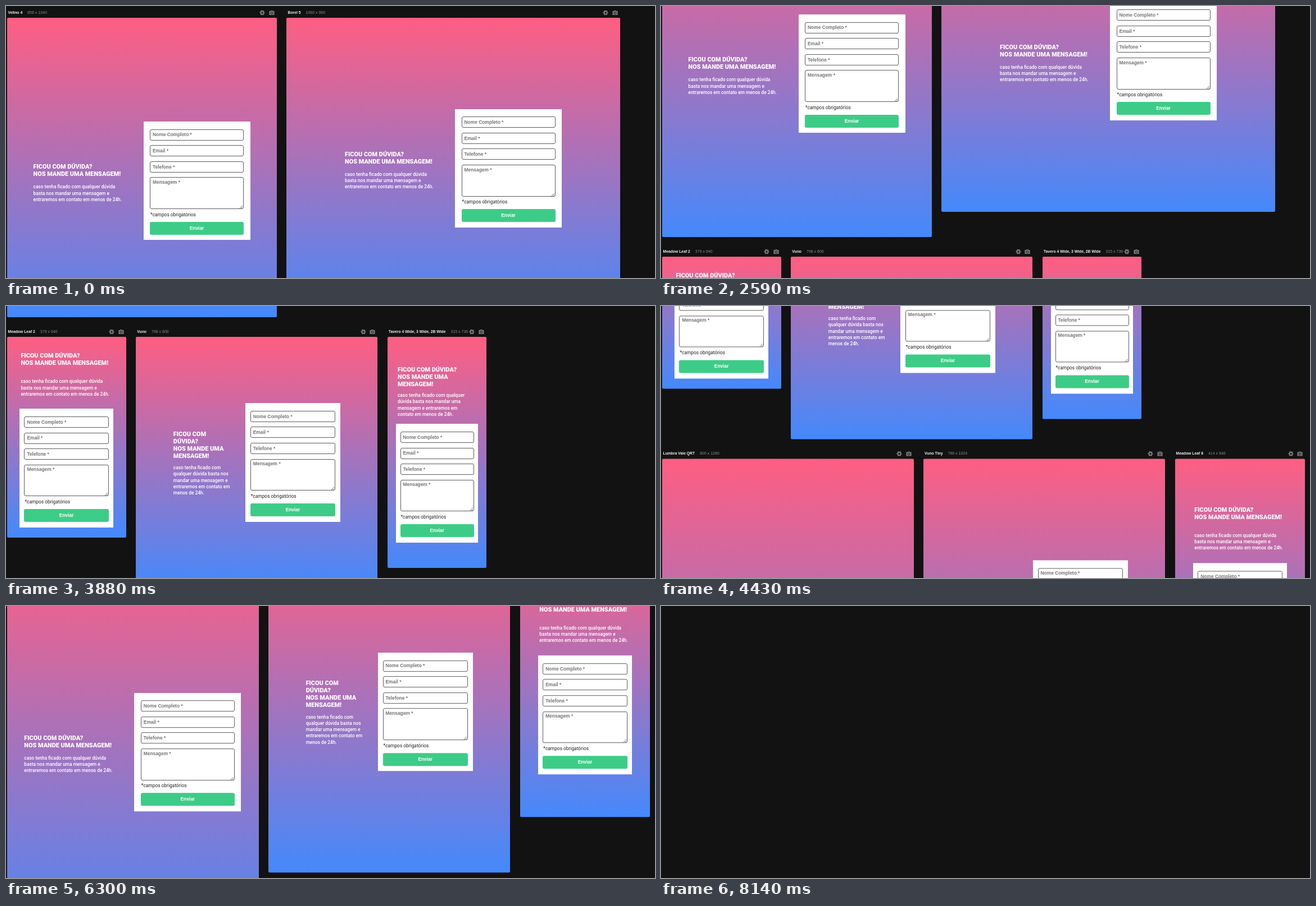
These frames come from a looping animation (1155x485 px, 8.6 s). An HTML page:

```html
<!DOCTYPE html>
<html lang="pt-BR">
<head>
<meta charset="utf-8">
<title>Formulário responsivo</title>
<style>
html, body { margin: 0; width: 100%; height: 100%; overflow: hidden; background: #121212; }
#stage { position: absolute; inset: 0; overflow: hidden; contain: strict; }
#page { position: absolute; inset: 0; }
#page div, #page svg { position: absolute; box-sizing: border-box; white-space: pre; }
.label { font: 7px/10px "Liberation Sans", Arial, sans-serif; color: #8a8a8a; }
.label b { margin-right: 9px; font-size: 6.8px; color: #eee; }
.screen { border-radius: 2px; background: linear-gradient(#ff5e82, #4489fc); }
.title { font: 900 10.9px/13px Roboto, sans-serif; color: #fff; }
.lead { font: 500 8.3px/11.2px Roboto, sans-serif; color: #fff; }
.form { background: #fff; }
.field { border: 1px solid #5c5c5c; border-radius: 3px; }
.hint, .send { font: bold 8.4px/12px "Liberation Sans", Arial, sans-serif; color: #757575; }
.note { font: 8.4px/12px Roboto, sans-serif; color: #222; }
.send { border-radius: 3px; background: #3dcc87; color: #fff; line-height: 23px; text-align: center; }
</style>
</head>
<body>
<div id="stage"><div id="page"></div></div>
<script>
const SCALE = 0.56, LOOP = 8600, FORM_HEIGHT = 211.5;
const page = document.getElementById('page');

const wideText = {
  title: 'FICOU COM DÚVIDA?\nNOS MANDE UMA MENSAGEM!',
  lead: 'caso tenha ficado com qualquer dúvida\nbasta nos mandar uma mensagem e\nentraremos em contato em menos de 24h.',
};
const tabletText = {
  title: 'FICOU COM\nDÚVIDA?\nNOS MANDE UMA\nMENSAGEM!',
  lead: 'caso tenha ficado com\nqualquer dúvida basta nos\nmandar uma mensagem e\nentraremos em contato em\nmenos de 24h.',
};
const phoneText = {
  title: 'FICOU COM DÚVIDA?\nNOS MANDE UMA\nMENSAGEM!',
  lead: 'caso tenha ficado com qualquer\ndúvida basta nos mandar uma\nmensagem e entraremos em\ncontato em menos de 24h.',
};

// x offsets start at the screen's centre line, title and lead heights at the form's top
const beside = { formY: -FORM_HEIGHT / 2 }, below = { formY: -50.7 };
const desktop = { ...wideText, ...beside, textX: -193.2, formX: 2.8, formW: 190, inset: 11.5, titleY: 74.5, leadY: 111.4 };
const tablet = { ...tabletText, ...beside, textX: -148.4, formX: -20.3, formW: 169, inset: 8.8, titleY: 48.5, leadY: 110 };
const mobile = { ...wideText, ...below, textX: -81.2, formX: -83.5, formW: 167, inset: 8.3, titleY: -101.5, leadY: -54 };
const phone = { ...phoneText, ...below, textX: -70, formX: -73, formW: 146, inset: 7.5, titleY: -103.5, leadY: -56 };

const rows = [
  [['Velino 4', 858, 1040, desktop], ['Borel 5', 1060, 960, desktop]],
  [['Meadow Leaf 2', 379, 640, mobile], ['Vuno', 768, 800, tablet], ['Tavero 4 Wide, 3 Wide, 2B Wide', 315, 736, phone]],
  [['Lumbra Vale QRT', 800, 1280, desktop], ['Vuno Tiny', 768, 1024, tablet], ['Meadow Leaf 8', 414, 846, mobile]],
];

function add(parent, cls, x, y, content = '', w, h) {
  const el = document.createElement('div');
  el.className = cls;
  el.innerHTML = content;
  Object.assign(el.style, { left: x + 'px', top: y + 'px' });
  if (w) Object.assign(el.style, { width: w + 'px', height: h + 'px' });
  parent.append(el);
  return el;
}

function addIcon(parent, x, y, shapes) {
  parent.insertAdjacentHTML('beforeend',
    `<svg style="left:${x - 5}px;top:${y - 5}px" width="10" height="10" viewBox="-5 -5 10 10">${shapes}</svg>`);
}

const gear = '<circle r="2.6" fill="none" stroke="#777" stroke-width="2.2"/>' +
  '<circle r="4" fill="none" stroke="#777" stroke-width="1.3" stroke-dasharray="2.09 2.1" stroke-dashoffset="1.05"/>';
const camera = '<path d="M-4.6-3h2.4l.8-1h2.8l.8 1h2.4v7h-9.2z" fill="#777"/>' +
  '<circle cy=".5" r="2" fill="#777" stroke="#121212" stroke-width=".9"/>';
const grip = '<path d="M-2 3L3-2M1 3L3 1" stroke="#555" stroke-width=".9"/>';

function addForm(screen, x, y, w, inset) {
  const form = add(screen, 'form', x, y, '', w, FORM_HEIGHT);
  const fieldW = w - 2 * inset;
  ['Nome Completo *', 'Email *', 'Telefone *', 'Mensagem *'].forEach((hint, i) => {
    const top = 13.7 + i * 28.6, isArea = i === 3;
    add(form, 'field', inset, top, '', fieldW, isArea ? 56.5 : 20);
    add(form, 'hint', inset + 5, top + (isArea ? 2.5 : 3.8), hint);
  });
  addIcon(form, inset + fieldW - 5, 152, grip);
  add(form, 'note', inset + 1, 159.8, '*campos obrigatórios');
  add(form, 'send', inset, 178.7, 'Enviar', fieldW, 23);
}

function addDevice(x, y, [name, pixelW, pixelH, layout]) {
  const w = pixelW * SCALE, h = pixelH * SCALE;
  add(page, 'label', x + 2, y - 13.5, `<b>${name}</b>${pixelW} x ${pixelH}`);
  addIcon(page, x + w - 25.8, y - 8.5, gear);
  addIcon(page, x + w - 9, y - 8.5, camera);
  const screen = add(page, 'screen', x, y, '', w, h);
  const formTop = h / 2 + layout.formY;
  add(screen, 'title', w / 2 + layout.textX, formTop + layout.titleY, layout.title);
  add(screen, 'lead', w / 2 + layout.textX, formTop + layout.leadY, layout.lead);
  addForm(screen, w / 2 + layout.formX, formTop, layout.formW, layout.inset);
}

let rowTop = 20.5;
for (const row of rows) {
  let x = 1.5;
  for (const device of row) {
    addDevice(x, rowTop, device);
    x += device[1] * SCALE + 17.5;
  }
  rowTop += Math.max(...row.map(device => device[2])) * SCALE + 35;
}

// Each scroll ends at its offset and advances in visible steps of about STEP ms
const STEP = 68, LEAD_IN = 40, RAMP = 140;
const scrolls = [
  { start: 2120, end: 2790, to: 248 },
  { start: 2930, end: 3210, to: 495 },
  { start: 3680, end: 4500, to: 857 },
  { start: 5030, end: 5910, to: 1214 },
  { start: 6300, end: 6510, to: 1307 },
  { start: 6650, end: 6780, to: 1401 },
  { start: 6980, end: 8140, to: 1900 },
];

// Constant speed with soft acceleration and braking
function glide(time, total) {
  const ramp = Math.min(RAMP, total / 2), speed = 1 / (total - ramp);
  if (time < ramp) return speed * time * time / (2 * ramp);
  if (time > total - ramp) return 1 - speed * (total - time) ** 2 / (2 * ramp);
  return speed * (time - ramp / 2);
}

function scrollAt(t) {
  let offset = 0;
  for (const { start, end, to } of scrolls) {
    if (t < start) break;
    const count = Math.round((end - start) / STEP), step = (end - start) / count;
    const elapsed = step * Math.min(count, Math.floor((t - start) / step + 0.1));
    offset += (to - offset) * glide(elapsed + LEAD_IN, end - start + LEAD_IN);
  }
  return offset;
}

const begin = performance.now();
function draw() {
  const t = (performance.now() - begin) % LOOP;
  page.style.transform = `translateY(${-scrollAt(t).toFixed(1)}px)`;
  requestAnimationFrame(draw);
}
draw();
</script>
</body>
</html>
```
